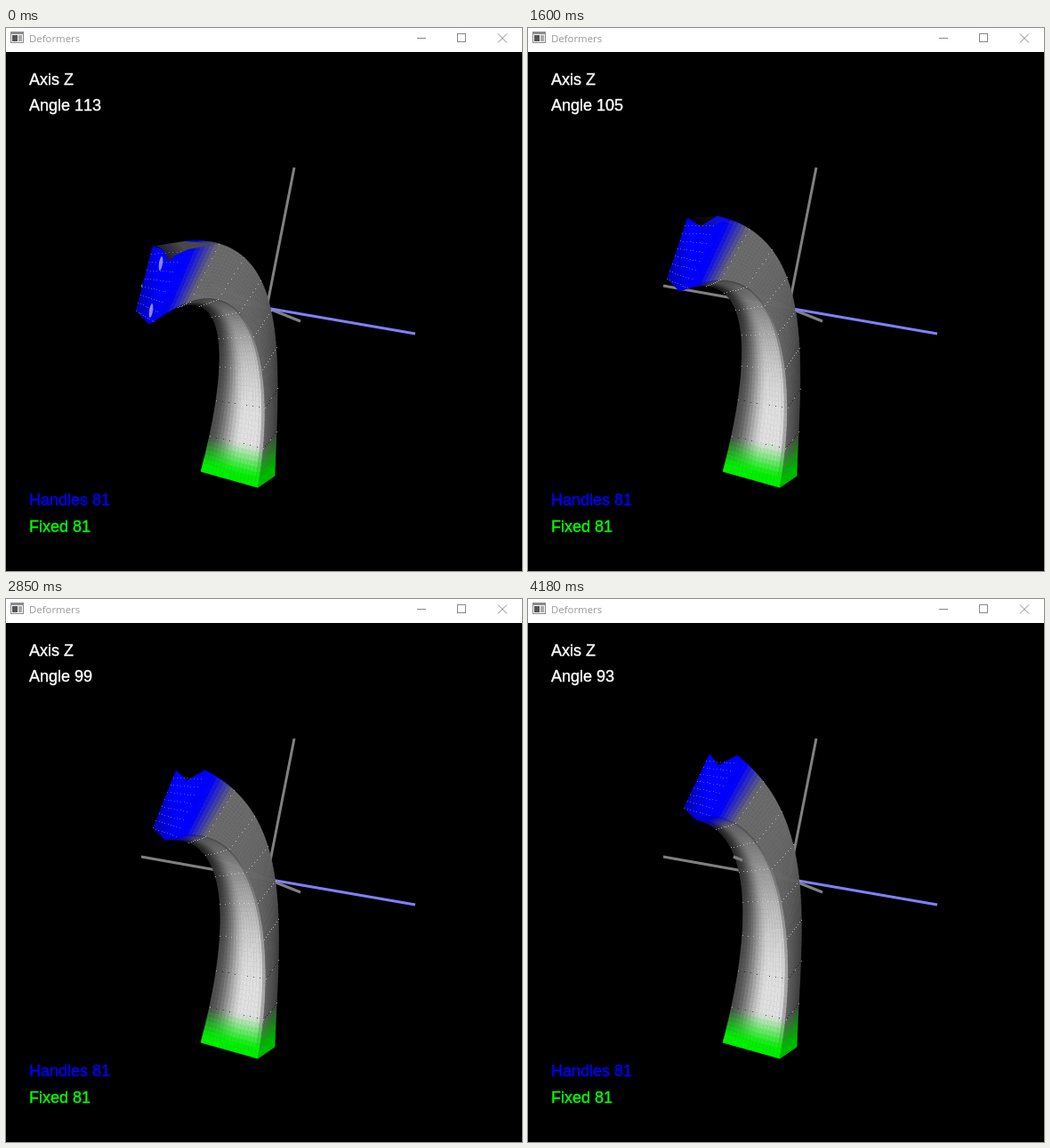
Write an HTML page with a canvas that moves like this. It is 580 px wide and 611 px high and loops after 4.42 s.

```html
<!DOCTYPE html>
<html>
<head>
<meta charset="utf-8">
<style>
  html, body { margin: 0; width: 580px; height: 611px; overflow: hidden; background: #000; }
  canvas { display: block; }
</style>
</head>
<body>
<canvas id="stage" width="580" height="611"></canvas>
<script>
const ctx = document.getElementById('stage').getContext('2d');
const LOOP = 4420, FIRST_ANGLE = 113, LEVELS = 8;
// Times at which the angle drops by one degree.
const steps = [0, 130, 270, 520, 770, 990, 1140, 1370, 1600, 1830, 2010,
  2240, 2470, 2700, 2850, 3080, 3260, 3480, 3710, 3950, 4180];

// Long edges of the bar as Bézier curves: the base stays, the bend and tip travel.
const rails = {
  inner: { base: [219, 499], stem: [247, 395], bend: [[263, 258], [261, 264]], tip: [[160, 333], [188, 248]] },
  ridge: { base: [283, 517], stem: [305, 403], bend: [[287, 240], [293, 250]], tip: [[166, 330], [203, 243]] },
  outer: { base: [302, 504], stem: [307, 371], bend: [[320, 229], [327, 248]], tip: [[200, 240], [235, 176]] }
};

const mix = (a, b, k) => a + (b - a) * k;
const mixPoint = (p, q, k) => [mix(p[0], q[0], k), mix(p[1], q[1], k)];
const clamp = x => Math.max(0, Math.min(1, x));
const smooth = x => (x = clamp(x)) * x * (3 - 2 * x);

// Linear travel between two poses plus the bow of the rotation.
function swing([from, to], u) {
  const [x, y] = mixPoint(from, to, u), bow = 4 * u * (1 - u);
  return [x - 1.5 * bow, y - 3 * bow];
}

function railPoint(name, t, u) {
  const { base, stem, bend, tip } = rails[name];
  let points = [base, stem, mixPoint(...bend, u), swing(tip, u)];
  while (points.length > 1)
    points = points.slice(1).map((p, i) => mixPoint(points[i], p, t / LEVELS));
  return points[0];
}

function polygon(points, fill, edge) {
  ctx.beginPath();
  points.forEach(p => ctx.lineTo(...p));
  ctx.closePath();
  ctx.fillStyle = fill;
  ctx.fill();
  if (edge) {
    ctx.strokeStyle = fill;
    ctx.lineWidth = edge;
    ctx.stroke();
  }
}

function line(x1, y1, x2, y2, color, width) {
  ctx.beginPath();
  ctx.moveTo(x1, y1);
  ctx.lineTo(x2, y2);
  ctx.strokeStyle = color;
  ctx.lineWidth = width;
  ctx.stroke();
}

function label(text, x, y, color) {
  ctx.font = '18px "Liberation Sans", Arial, sans-serif';
  ctx.fontKerning = 'none';
  ctx.fillStyle = ctx.strokeStyle = color;
  ctx.lineWidth = .4;
  ctx.fillText(text, x, y);
  ctx.strokeText(text, x, y);
}

function dot([x, y], color) {
  ctx.fillStyle = color;
  ctx.fillRect(Math.round(x), Math.round(y), 1, 1);
}

function frontGray(s, t, u) {
  const light = mix(225, mix(45, 95, u), smooth((t - 1.5) / 6.5));
  return light * (.35 + .65 * smooth(s / .6) - .3 * smooth((s - .88) / .12));
}

const sideGray = (s, t) => mix(mix(100, 66, s), 108, smooth((t - 2) / 4));

function tint(gray, t, green, blue) {
  const g = clamp((1 - t) * 1.3), b = clamp((t - 7) * 1.4);
  const base = gray * (1 - g) * (1 - b);
  return `rgb(${base},${base + green * g},${base + blue * b})`;
}

function face(left, right, u, shade, green, blue) {
  const across = 16, along = 64;
  for (let j = 0; j < along; j++) {
    const t0 = j / along * LEVELS, t1 = (j + 1) / along * LEVELS, t = (t0 + t1) / 2;
    const [a, b, c, d] = [[left, t0], [right, t0], [right, t1], [left, t1]]
      .map(([rail, level]) => railPoint(rail, level, u));
    for (let i = 0; i < across; i++) {
      const s0 = i / across, s1 = (i + 1) / across;
      polygon([mixPoint(a, b, s0), mixPoint(a, b, s1), mixPoint(d, c, s1), mixPoint(d, c, s0)],
        tint(shade((s0 + s1) / 2, t, u), t, green, blue), .6);
    }
  }
  for (let t = 1; t < LEVELS; t++)
    for (let i = 0; i <= 8; i++)
      dot(mixPoint(railPoint(left, t, u), railPoint(right, t, u), i / 8),
        t < 3 && i % 4 ? 'rgba(0,0,0,.6)' : 'rgba(235,235,235,.6)');
}

function cap(u) {
  const back = swing([[165, 245], [204, 174]], u);
  const low = swing([[146, 318], [175, 235]], u);
  const notch = swing([[183, 252], [214, 187]], u);
  const [tip, ridge, outer] = ['inner', 'ridge', 'outer'].map(name => railPoint(name, LEVELS, u));

  const fill = ctx.createLinearGradient(low[0], 0, low[0] + 28, 0);
  fill.addColorStop(0, '#0000b0');
  fill.addColorStop(1, '#00f');
  polygon([back, notch, outer, ridge, tip, low], fill);

  // Shaded hollow along the top, turning out of view.
  const hollow = clamp(1 - 2 * u);
  if (hollow) {
    const [x, y] = back;
    ctx.globalAlpha = hollow;
    const dark = ctx.createLinearGradient(x + 14, y + 18, x + 32, y);
    dark.addColorStop(0, '#101030');
    dark.addColorStop(1, '#484848');
    polygon([[x + 3, y], outer, railPoint('outer', 7, u), [x + 40, y + 4],
      [x + 25, y + 11], [x + 18, y + 18], [x + 12, y + 5]], dark);
    ctx.globalAlpha = 1;
  }

  for (let j = 1; j <= 8; j++)
    for (let i = 0; i <= 8; i++)
      dot(mixPoint(mixPoint(back, outer, i / 8), mixPoint(low, ridge, i / 8), j / 8),
        'rgba(205,205,255,.4)');

  // Glints
  ctx.fillStyle = `rgba(225,225,255,${.6 * clamp(1 - 2.6 * u)})`;
  for (const path of [[[174, 265], [204, 180]], [[163, 318], [195, 235]]]) {
    ctx.beginPath();
    ctx.ellipse(...swing(path, u), 2, 8, .15, 0, 2 * Math.PI);
    ctx.fill();
  }
}

function box(x, y, w, h, color) {
  ctx.fillStyle = color;
  ctx.fillRect(x, y, w, h);
}

function titleBar() {
  box(0, 0, 580, 27, '#fff');
  box(5, 4, 15, 13, '#8c8c8c');
  box(6, 7, 13, 9, '#f4f4f4');
  box(7, 8, 6, 7, '#555');
  box(14, 8, 4, 7, '#aaa');
  ctx.font = '11.4px "Open Sans", sans-serif';
  ctx.fillStyle = '#999';
  ctx.fillText('Deformers', 26, 16);
  line(462, 11.5, 472, 11.5, '#888', 1);
  ctx.strokeRect(507.5, 6.5, 9, 9);
  line(553, 6.5, 563, 16.5, '#888', 1);
  line(563, 6.5, 553, 16.5, '#888', 1);
}

function draw(step) {
  const u = step / (steps.length - 1);
  box(0, 0, 580, 611, '#000');
  titleBar();

  line(152, 290, 298, 316, '#808080', 3);
  line(231, 290, 331, 330, '#808080', 3);
  line(324, 157, 294, 310, '#808080', 3);
  line(298, 316, 460, 344, '#8080ff', 3);

  face('inner', 'ridge', u, frontGray, 240, 215);
  face('ridge', 'outer', u, sideGray, 190, 255);
  cap(u);

  // One axis starts to poke through the bar near the end.
  const stub = Math.max(0, (u - .75) * 40);
  if (stub) line(231, 290, 231 + stub, 290 + stub * .4, '#808080', 3);

  label('Axis Z', 26, 64, '#fff');
  label('Angle ' + (FIRST_ANGLE - step), 26, 93, '#fff');
  label('Handles 81', 26, 537, '#00f');
  label('Fixed 81', 26, 567, '#0f0');
}

let shown = -1;
function tick() {
  const time = performance.now() % LOOP;
  const step = steps.findLastIndex(start => start <= time);
  if (step !== shown) draw(shown = step);
  requestAnimationFrame(tick);
}
tick();
</script>
</body>
</html>
```
